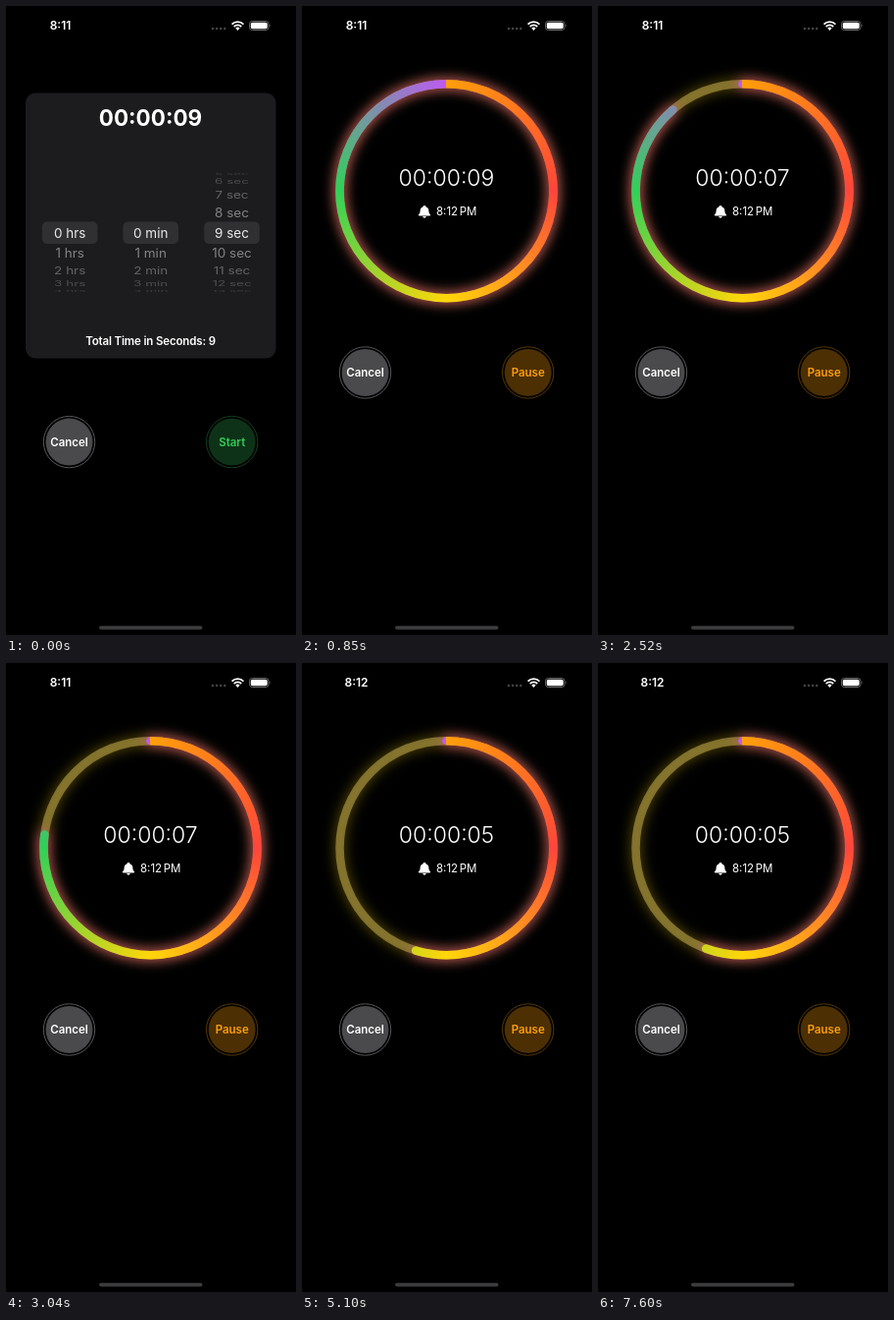
These frames come from a looping animation (296 by 640 pixels, 8000 ms). An HTML page with a canvas:

```html
<!DOCTYPE html>
<html lang="en">
<head>
<meta charset="utf-8">
<title>Countdown timer</title>
<style>
  html, body { margin: 0; width: 100%; height: 100%; overflow: hidden; background: #000; }
  canvas, svg { position: absolute; left: 0; top: 0; width: 296px; height: 640px; }
  text { font-family: Inter, Roboto, sans-serif; text-anchor: middle; fill: #fff; }
  .btn text { font-size: 11.5px; font-weight: 600; }
</style>
</head>
<body>
<canvas id="ring"></canvas>
<svg viewBox="0 0 296 640">
  <g id="status">
    <text id="clock" x="55.5" y="24.3" font-size="12" font-weight="600">8:11</text>
    <g fill="#48484a">
      <circle cx="211" cy="23" r="1.2"/><circle cx="215.2" cy="23" r="1.2"/>
      <circle cx="219.2" cy="23" r="1.2"/><circle cx="223.3" cy="23" r="1.2"/>
    </g>
    <g fill="none" stroke="#fff" stroke-width="1.8">
      <path d="M230.6 18.6a8.2 8.2 0 0 1 11.8 0"/>
      <path d="M232.8 21a5.2 5.2 0 0 1 7.4 0"/>
    </g>
    <path d="M234.4 22.6a3 3 0 0 1 4.2 0L236.5 24.9z" fill="#fff"/>
    <rect x="248.5" y="15.5" width="19.5" height="9" rx="2.8" fill="none" stroke="#6a6a6c"/>
    <rect x="249.8" y="16.8" width="16.9" height="6.4" rx="1.7" fill="#fff"/>
    <path d="M269.2 18.4q1.4 1.6 0 3.2z" fill="#6a6a6c"/>
  </g>
  <rect x="95" y="630.8" width="105.5" height="3.6" rx="1.8" fill="#3c3c3e"/>

  <g id="picker">
    <rect x="20" y="88.5" width="255.5" height="270" rx="10" fill="#1c1c1e"/>
    <text x="147.5" y="122" font-size="22.5" font-weight="700">00:00:09</text>
    <g id="wheels"></g>
    <text x="147.5" y="344.8" font-size="11.5" font-weight="600" letter-spacing="-.15">Total Time in Seconds: 9</text>
  </g>

  <g id="timer">
    <text id="count" x="147.5" y="183" font-size="23" font-weight="300">00:00:09</text>
    <path d="M125 203c.9 0 1.3.5 1.4 1.2 2 .6 2.9 2.2 3 4.300.1 2 .5 2.600 1.500 3.600.5.600.200 1.300-.6 1.300H119.700c-.8 0-1.100-.7-.6-1.300 1-1 1.400-1.600 1.500-3.600.1-2.100 1-3.700 3-4.300.1-.7.500-1.200 1.400-1.200zM123.200 214.100h3.600q-.3 1.700-1.800 1.700t-1.800-1.700z" fill="#fff"/>
    <text x="137" y="213.300" font-size="11.5" style="text-anchor:start">8:12<tspan dx="1.5">PM</tspan></text>
  </g>

  <g id="buttons"></g>
</svg>
<script>
const LOOP = 8000, FULL = 9, STEP = 1000, FIRST = 1460, TICKS = 4;
const NS = 'http://www.w3.org/2000/svg';
const $ = id => document.getElementById(id);

function add(parent, tag, attrs = {}, text = '') {
  const el = document.createElementNS(NS, tag);
  for (const k in attrs) el.setAttribute(k, attrs[k]);
  el.textContent = text;
  return parent.appendChild(el);
}

// Picker wheels: rows lie on a cylinder
function wheel(cx, value, unit) {
  const g = $('wheels');
  add(g, 'rect', { x: cx - 28.3, y: 219.5, width: 56.6, height: 22.5, rx: 5, fill: '#303033' });
  for (let k = -4; k <= 4; k++) {
    if (value + k < 0) continue;
    const a = k * 19.6 * Math.PI / 180, y = 230.7 + 61 * Math.sin(a);
    add(g, 'text', {
      transform: `translate(${cx} ${y}) scale(1 ${Math.cos(a)})`, y: 4.9, 'font-size': 13.5,
      'fill-opacity': [0.9, 0.46, 0.32, 0.22, 0.14][Math.abs(k)]
    }, `${value + k} ${unit}`);
  }
}
wheel(65.2, 0, 'hrs');
wheel(147.7, 0, 'min');
wheel(230.5, 9, 'sec');

function button(cx, label, color, fill, rim) {
  const g = add($('buttons'), 'g', { class: 'btn' });
  add(g, 'circle', { cx, cy: 0, r: 26.2, fill: '#000', stroke: rim });
  add(g, 'circle', { cx, cy: 0, r: 24, fill });
  add(g, 'text', { x: cx, y: 4.2, style: `fill:${color}` }, label);
  return g;
}
button(64.5, 'Cancel', '#fff', '#4a4a4c', '#58585a');
const start = button(230.7, 'Start', '#30d158', '#0e3218', '#17401f');
const pause = button(230.7, 'Pause', '#ff9f0a', '#4c2f03', '#573806');
const resume = button(230.7, 'Resume', '#6be26a', '#245027', '#2a5a2d');

const ring = $('ring'), dpr = window.devicePixelRatio || 1;
ring.width = 296 * dpr;
ring.height = 640 * dpr;
const ctx = ring.getContext('2d');
ctx.scale(dpr, dpr);
const CX = 147.5, CY = 188.2, R = 109, TOP = -Math.PI / 2;
const hues = ctx.createConicGradient(TOP, CX, CY);
['#ff9f0a', '#ff453a', '#ffd60a', '#30d158', '#bf5af2'].forEach((c, i) => hues.addColorStop(i / 4, c));

function arc(part, style, glow) {
  ctx.beginPath();
  ctx.arc(CX, CY, R, TOP, TOP + part * 2 * Math.PI);
  ctx.lineWidth = 8.6;
  ctx.lineCap = 'round';
  ctx.strokeStyle = style;
  ctx.shadowColor = glow;
  ctx.shadowBlur = 13 * dpr;
  ctx.stroke();
}

const clamp = x => Math.min(1, Math.max(0, x));
const ease = (t, from, to) => (1 - Math.cos(Math.PI * clamp((t - from) / (to - from)))) / 2;

// Underdamped spring, 0 to 1, time in seconds
function spring(s) {
  if (s <= 0) return 0;
  const decay = 4, w = 5.07;
  return 1 - Math.exp(-decay * s) * (Math.cos(w * s) + decay / w * Math.sin(w * s));
}

function draw(t) {
  const running = t >= 500;
  $('picker').style.display = running ? 'none' : '';
  $('timer').style.display = running ? '' : 'none';
  $('clock').textContent = t < 4400 ? '8:11' : '8:12';

  const ticks = Math.min(TICKS, Math.max(0, Math.floor((t - FIRST) / STEP) + 1));
  $('count').textContent = '00:00:0' + (FULL - ticks);

  const moved = ease(t, 500, 850);
  $('buttons').setAttribute('transform', `translate(0 ${443.6 - 70.6 * moved})`);
  start.style.opacity = moved < 1 ? 1 : 0;
  pause.style.opacity = moved;
  resume.style.opacity = ease(t, 5330, 5700) - ease(t, 7220, 7600);

  ctx.clearRect(0, 0, 296, 640);
  if (!running) return;
  let left = FULL;
  for (let i = 0; i < TICKS; i++) left -= spring((t - FIRST - 35 - i * STEP) / 1000);
  arc(1, 'rgba(255, 225, 110, .4)', '#ffd60a');
  arc(clamp(left / FULL), hues, 'rgba(255, 90, 150, .8)');
}

const origin = performance.now();
function frame() {
  draw((performance.now() - origin) % LOOP);
  requestAnimationFrame(frame);
}
frame();
</script>
</body>
</html>
```
